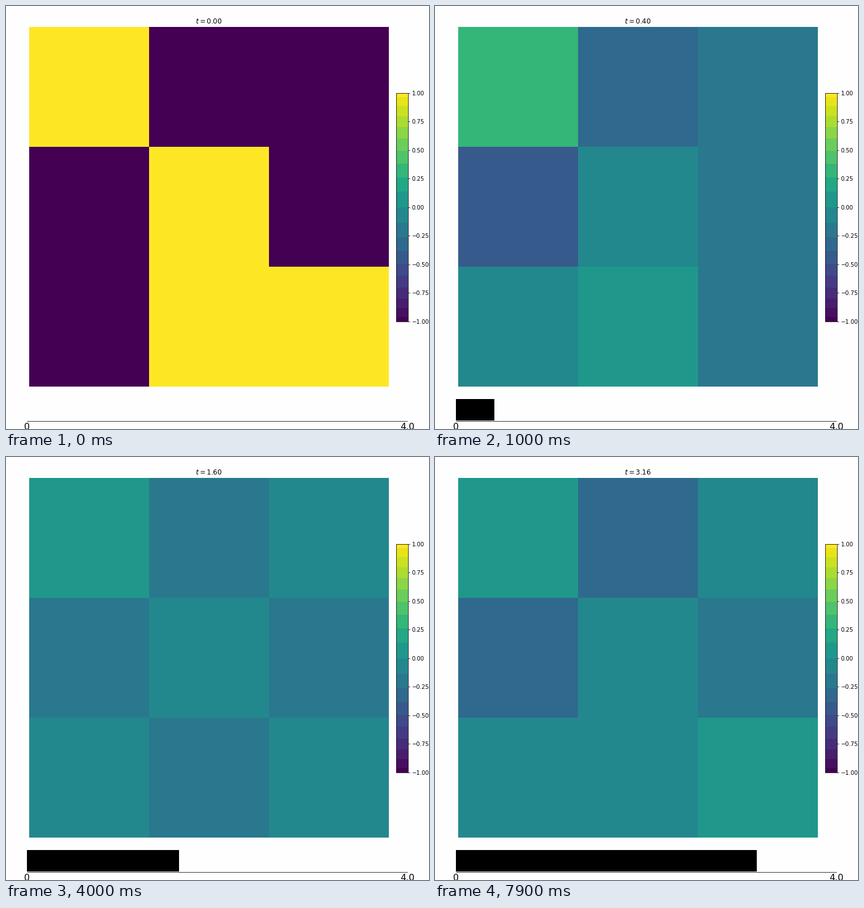
Animation of 748 by 748 pixels, one loop 8 s. Source, as a matplotlib script:

```python
import numpy as np
import matplotlib.pyplot as plt
from matplotlib.animation import FuncAnimation
from matplotlib.patches import Rectangle

SIZE, DPI = 748, 72  # one point is one pixel
FRAMES, INTERVAL, DT = 80, 100, 0.04

plt.rcParams["font.family"] = "DejaVu Sans"
plt.rcParams["mathtext.fontset"] = "dejavusans"
cmap = plt.get_cmap("viridis")

# The colour scale has 20 tones, closer together towards both ends
k = np.arange(10)
half = .07 + .1333 * k - .0033 * k ** 2
TONES = np.concatenate([-half[::-1], half])

# Spins are quenched, then relax towards a faint checkerboard
START = np.array([[1, -1, -1], [-1, 1, -1], [-1, 1, 1]])
QUENCHED = np.array([[.61, -.43, -.43], [-.74, .08, -.08], [.08, .28, -.33]])
T_QUENCH, TAU = .12, .35
rows, cols = np.indices((3, 3))
REST = np.where((rows + cols) % 2, -.2, -.08)
REST[0, 0] = .07

# Later flips: (time, row, column, new level)
FLIPS = [(.6, 2, 0, .1), (1.34, 2, 0, -.08), (2.22, 2, 2, .07),
         (2.7, 1, 0, -.32), (2.78, 0, 1, -.32), (3.02, 2, 1, -.08)]


def color(value):
    return cmap((value + 1) / 2)


def lattice(t):
    if t < T_QUENCH:
        left = (1 - t / T_QUENCH) ** 1.5
        values = QUENCHED + (START - QUENCHED) * left
    else:
        values = REST + (QUENCHED - REST) * np.exp((T_QUENCH - t) / TAU)
    for when, r, c, level in FLIPS:
        if t >= when:
            values[r, c] = level
    return TONES[np.abs(values[..., None] - TONES).argmin(axis=-1)]


fig = plt.figure(figsize=(SIZE / DPI, SIZE / DPI), dpi=DPI, facecolor="#fefefe")
ax = fig.add_axes([0, 0, 1, 1])
ax.set(xlim=(0, SIZE), ylim=(SIZE, 0))
ax.axis("off")


def box(x0, y0, x1, y1, **style):
    style = {"lw": 0, "antialiased": False, **style}
    return ax.add_patch(Rectangle((x0, y0), x1 - x0, y1 - y0, **style))


def label(x, y, text, size, ha="center", va="baseline"):
    return ax.text(x, y, text, fontsize=size, ha=ha, va=va)


def line(xs, ys):
    ax.plot(xs, ys, color="black", lw=.8, solid_capstyle="butt")


# Lattice cells
X, Y, CELL = 41, 37, 212
cells = [box(X + c * CELL, Y + r * CELL, X + (c + 1) * CELL, Y + (r + 1) * CELL)
         for r in range(3) for c in range(3)]
title = label(X + 1.5 * CELL, Y - 6, "", 12)

# Colour bar
LEFT, RIGHT, TOP, BOTTOM = 690.4, 710.6, 153.6, 557.8


def bar_y(value):
    return BOTTOM + (TOP - BOTTOM) * (value + 1) / 2


edges = np.concatenate([[-1], (TONES[1:] + TONES[:-1]) / 2, [1]])
for tone, lo, hi in zip(TONES, edges, edges[1:]):
    box(LEFT, bar_y(hi), RIGHT, bar_y(lo), color=color(tone))
box(LEFT, TOP, RIGHT, BOTTOM, fill=False, ec="black", lw=.8, antialiased=True)
for v in np.linspace(-1, 1, 9):
    line([RIGHT, RIGHT + 3.5], [bar_y(v)] * 2)
    label(RIGHT + 7, bar_y(v), f"{v:.2f}".replace("-", "\u2212"), 10,
          "left", "center_baseline")

# Time bar
X0, X1, T_MAX = 37.25, 710.25, 4.0
line([X0, X1], [733.9, 733.9])
label(X0, 749, "0", 16)
label(X1, 749, f"{T_MAX}", 16)
progress = box(X0, 695, X0, 733, color="black")


def update(i):
    t = i * DT
    title.set_text(f"$t = {t:.2f}$")
    for cell, value in zip(cells, lattice(t).flat):
        cell.set_facecolor(color(value))
    progress.set_width((X1 - X0) * t / T_MAX)
    progress.set_visible(i > 0)
    return [*cells, title, progress]


anim = FuncAnimation(fig, update, frames=FRAMES, interval=INTERVAL,
                     repeat=True, repeat_delay=0, blit=False)
plt.show()
```
